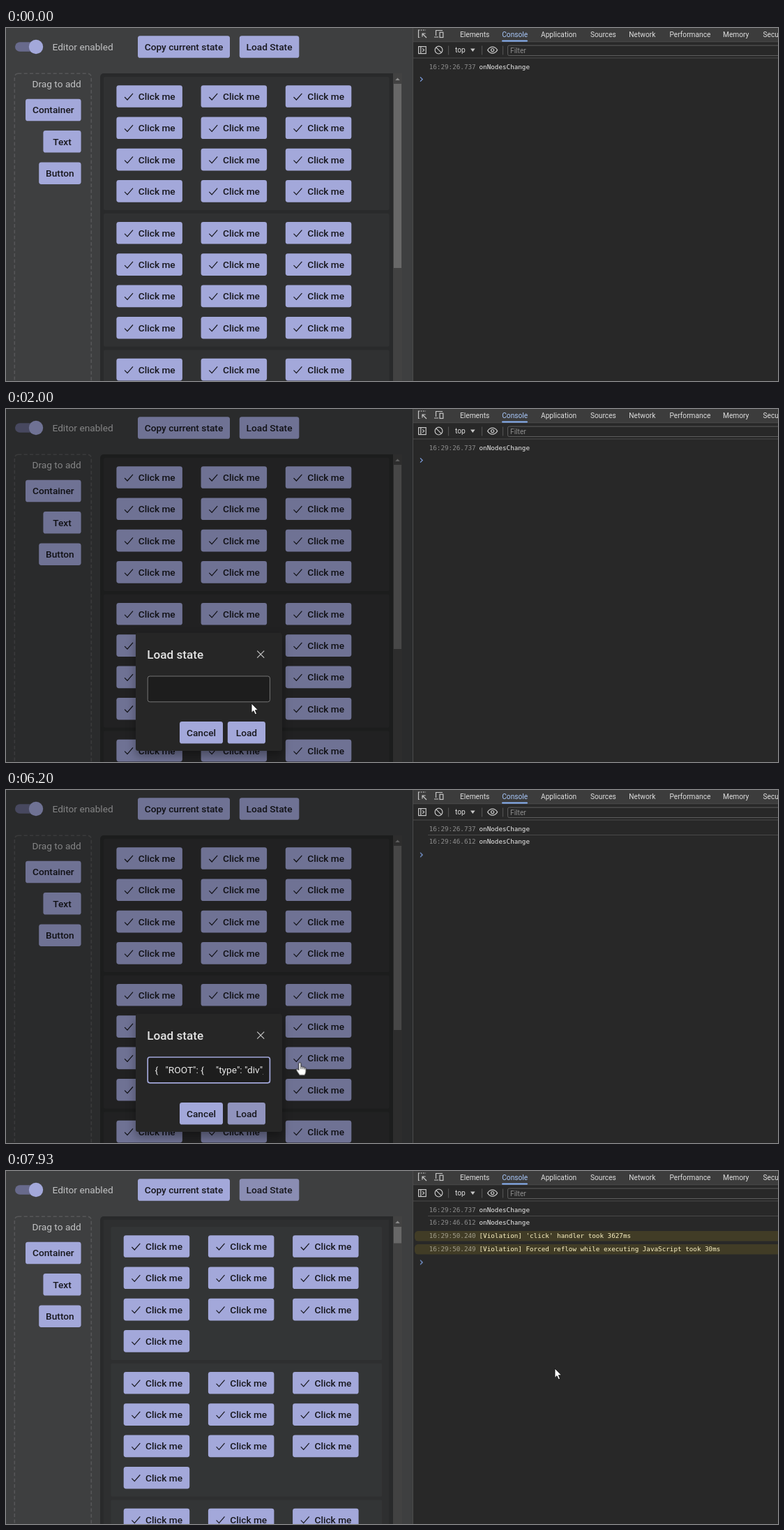
Animation, 1107 px wide and 506 px high, one loop 8 s. Source, as an HTML page:

```html
<!DOCTYPE html>
<html lang="en">
<head>
<meta charset="utf-8">
<title>Editor state loading</title>
<style>
  html, body { margin: 0; width: 100%; height: 100%; overflow: hidden; background: #282828; }
  svg { display: block; width: 100vw; height: 100vh; }
  text { white-space: pre; }
  .ui { font: 13.7px Roboto, sans-serif; fill: #c1c2c3; }
  .label { font: 500 13.7px Roboto, sans-serif; fill: #17171d; }
  .title { font: 500 17.1px Roboto, sans-serif; fill: #e4e4e4; }
  .dev { font: 10.2px Roboto, sans-serif; fill: #dedede; }
  .log { font: 9.28px "DejaVu Sans Mono", monospace; fill: #ececec; }
  .log .time { fill: #8e8e8e; }
  .warn { fill: #fcf3c4; }
  .warn .time { fill: #a39f8c; }
  .btn { fill: #a3a8da; }
  .line { fill: none; stroke: #c7c7c7; stroke-width: 1.2; }
  .check { fill: none; stroke: #17171d; stroke-width: 1.2; }

  /* One loop is 120 ticks of 1/15 s; one tick is 0.8333 % */
  .a { animation: 8s -4ms step-end infinite; }
  #before { animation-name: before; }
  #after { animation-name: after; }
  #loadState { animation-name: press; }
  #shade { animation-name: shade; }
  #dialog { animation-name: dialog; transform-origin: 291px 404px; }
  #field { animation-name: focus; }
  #pasted { animation-name: paste; }
  #loadBtn { animation-name: loadPress; }
  #log2 { animation-name: log2; }
  #warn1 { animation-name: warn1; }
  #warn2 { animation-name: warn2; }
  #prompt { animation-name: prompt; }
  #cursor { animation-name: move; }
  #arrow { animation-name: arrow; }
  #beam { animation-name: beam; }
  #hand { animation-name: hand; }

  @keyframes before { 0% { opacity: 1 } 89.167%, 100% { opacity: 0 } }
  @keyframes after { 0% { opacity: 0 } 89.167%, 100% { opacity: 1 } }
  @keyframes press {
    0% { fill: #a3a8da } 13.333% { fill: #8a8db3 } 18.333% { fill: #a3a8da }
    90%, 100% { fill: #8a8db3 }
  }
  @keyframes shade {
    0% { opacity: 0 } 17.5% { opacity: .1 } 18.333% { opacity: .6 } 19.167% { opacity: .92 }
    20% { opacity: 1 } 89.167% { opacity: .6 } 90% { opacity: .15 } 90.833%, 100% { opacity: 0 }
  }
  @keyframes dialog {
    0% { opacity: 0; transform: scale(.7) }
    17.5% { opacity: .29; transform: scale(.785) }
    18.333% { opacity: .9; transform: scale(.97) }
    19.167% { opacity: 1; transform: none }
    89.167% { opacity: .5; transform: scale(.85) }
    90%, 100% { opacity: 0; transform: scale(.7) }
  }
  @keyframes focus {
    0% { stroke: #757575; stroke-width: 1 }
    29.167%, 100% { stroke: #a3a8da; stroke-width: 1.7 }
  }
  @keyframes paste { 0% { opacity: 0 } 33.333%, 100% { opacity: 1 } }
  @keyframes loadPress { 0% { fill: #a3a8da } 42.5%, 100% { fill: #9093bd } }
  @keyframes log2 { 0% { opacity: 0 } 43.333%, 100% { opacity: 1 } }
  @keyframes warn1 { 0% { opacity: 0 } 88.333%, 100% { opacity: 1 } }
  @keyframes warn2 { 0% { opacity: 0 } 89.167%, 100% { opacity: 1 } }
  @keyframes prompt {
    0% { transform: none } 43.333% { transform: translateY(19.5px) }
    88.333% { transform: translateY(38.5px) } 89.167%, 100% { transform: translateY(57.5px) }
  }
  @keyframes move {
    0% { transform: translate(1200px, 600px) }
    .833% { transform: translate(1079px, 488px); animation-timing-function: steps(6) }
    5.833% { transform: translate(640px, 290px); animation-timing-function: steps(6) }
    10.833% { transform: translate(291px, 102px); animation-timing-function: steps(4) }
    14.167% { transform: translate(377px, 21px) }
    20% { transform: translate(377px, 21px); animation-timing-function: steps(2) }
    21.667% { transform: translate(379px, 127px); animation-timing-function: steps(4) }
    25% { transform: translate(352px, 422px); animation-timing-function: steps(3) }
    27.5% { transform: translate(300px, 401px) }
    35% { transform: translate(300px, 401px); animation-timing-function: steps(6) }
    40% { transform: translate(345.5px, 463px) }
    58.333% { transform: translate(345.5px, 463px); animation-timing-function: steps(8) }
    65% { transform: translate(487.5px, 354px); animation-timing-function: steps(2) }
    66.667% { transform: translate(504px, 345px) }
    67.5% { transform: translate(504px, 345px); animation-timing-function: steps(3) }
    70% { transform: translate(597px, 372px); animation-timing-function: steps(3) }
    72.5% { transform: translate(545px, 319px); animation-timing-function: steps(4) }
    75.833% { transform: translate(384px, 372px); animation-timing-function: steps(3) }
    78.333% { transform: translate(440px, 400px); animation-timing-function: steps(12) }
    88.333% { transform: translate(523px, 411px) }
    89.167% { transform: translate(523px, 411px); animation-timing-function: steps(12) }
    99.167%, 100% { transform: translate(787px, 283px) }
  }
  @keyframes arrow {
    0% { opacity: 1 } 14.167% { opacity: 0 } 17.5% { opacity: 1 } 26.667% { opacity: 0 }
    88.333%, 100% { opacity: 1 }
  }
  @keyframes beam { 0% { opacity: 0 } 26.667% { opacity: 1 } 37.5%, 100% { opacity: 0 } }
  @keyframes hand {
    0% { opacity: 0 } 14.167% { opacity: 1 } 17.5% { opacity: 0 }
    37.5% { opacity: 1 } 88.333%, 100% { opacity: 0 }
  }
</style>
</head>
<body>
<svg viewBox="0 0 1107 506" preserveAspectRatio="none">
  <defs>
    <g id="click">
      <rect class="btn" width="94.5" height="31.6" rx="3.4"/>
      <path class="check" d="M11.7 16.8l3.9 4 8-9.2"/>
      <text class="label" x="31.4" y="20.8">Click me</text>
    </g>
    <clipPath id="fieldClip"><rect x="213" y="385" width="156" height="32"/></clipPath>
    <filter id="shadow" x="-20%" y="-20%" width="140%" height="150%">
      <feDropShadow dx="0" dy="7" stdDeviation="7" flood-opacity=".35"/>
    </filter>
  </defs>

  <!-- Page -->
  <rect width="583" height="506" fill="#3e3f40"/>
  <rect x="13" y="20.2" width="37" height="13.6" rx="6.8" fill="#686a8c"/>
  <circle class="btn" cx="43" cy="27" r="10.2"/>
  <text class="ui" x="66.5" y="31.6">Editor enabled</text>
  <rect x="12.3" y="65.3" width="110" height="460" rx="5" fill="none" stroke="#565758" stroke-width="1.6" stroke-dasharray="5 3.4"/>
  <text class="ui" x="107.8" y="84.6" text-anchor="end">Drag to add</text>
  <g id="tools"></g>
  <path d="M135 506V70a5 5 0 0 1 5-5H555V506z" fill="#292a2b"/>
  <rect x="555" y="65" width="13" height="441" fill="#424242"/>
  <path d="M558.2 75l3.3-3.6 3.3 3.6z" fill="#8a8a8a"/>
  <g id="before" class="a"><rect x="556" y="80" width="11" height="264" fill="#686868"/></g>
  <g id="after" class="a">
    <rect x="140" y="70" width="409" height="436" fill="#2e2f30"/>
    <rect x="556" y="80" width="11" height="23.5" fill="#686868"/>
  </g>
  <rect id="shade" class="a" width="583" height="506" fill="#000" fill-opacity=".32"/>

  <!-- Dialog -->
  <g id="dialog" class="a">
    <rect x="186" y="320.5" width="210" height="169.5" rx="3.4" fill="#252525" filter="url(#shadow)"/>
    <text class="title" x="202.3" y="357.8">Load state</text>
    <path class="line" d="M360.2 346.7l10 10m0-10l-10 10"/>
    <rect id="field" class="a" x="203.2" y="383" width="175.2" height="36.8" rx="3" fill="#1d1d1d"/>
    <g clip-path="url(#fieldClip)">
      <text id="pasted" class="ui a" x="213.6" y="406.2" style="fill:#e6e6e6">{   "ROOT": {     "type": "div",     "isCanvas": true,</text>
    </g>
    <g id="actions"></g>
  </g>

  <!-- Developer tools -->
  <rect x="583" width="524" height="506" fill="#282828"/>
  <rect x="583" width="524" height="19.5" fill="#3c3c3c"/>
  <path d="M583.5 0V506M583 19.7H1107M583 43H1107" stroke="#4b4b4b" fill="none"/>
  <rect x="711" y="17.6" width="37" height="2" rx="1" fill="#8ab4f8"/>
  <g id="tabs"></g>
  <g class="line">
    <path d="M591.5 13V3H602M591.5 3v10.5h3" stroke-dasharray="2 1.3"/>
    <path d="M603 14l-6-6m0 4.6V8h4.6"/>
    <path d="M616.5 11V3.5H626M614 13h6"/>
    <rect x="622" y="6.2" width="4.8" height="7.3"/>
    <rect x="591.6" y="26.6" width="10.6" height="10"/>
    <path d="M594.8 26.6v10m2.4-7.2l2.4 2.2-2.4 2.2"/>
    <circle cx="620.5" cy="31.6" r="5.4"/>
    <path d="M616.8 27.8l7.5 7.6"/>
    <path d="M690.6 31.6c3.5-6 10.4-6 14 0-3.6 6-10.5 6-14 0z"/>
    <circle cx="697.6" cy="31.6" r="2.1"/>
    <path d="M634.5 25.5v13M682.5 25.5v13M712.5 25.5v13" stroke="#505050"/>
    <rect x="719.5" y="25" width="395" height="14.5" rx="2" stroke="#5d5d5d" stroke-width="1"/>
  </g>
  <text class="dev" x="644" y="35.4">top</text>
  <path d="M666 29.6h6.6l-3.3 4.4z" fill="#c7c7c7"/>
  <text class="dev" x="723" y="36.2" style="fill:#8f8f8f">Filter</text>
  <g id="console"></g>
  <path id="prompt" class="a" d="M594 70.4l3.2 3.1-3.2 3.1" fill="none" stroke="#7e9fe0" stroke-width="1.2"/>

  <!-- Pointer -->
  <g id="cursor" class="a" stroke="#111" stroke-width=".9" stroke-linejoin="round">
    <path id="arrow" class="a" d="M0 0V13.4L3 10.7 5.2 15.8 7.5 14.8 5.4 9.8H9.5z" fill="#fff"/>
    <path id="beam" class="a" d="M-2.5-7H-.6L0-6.4.6-7H2.5M0-6.4V6.4M-2.5 7H-.6L0 6.4.6 7H2.5" fill="none" stroke="#ddd"/>
    <path id="hand" class="a" d="M-1.7 1.2C-1.7-.4 1.6-.4 1.6 1.2V6.2C2.2 5.2 4 5.4 4.2 6.6 5 5.9 6.5 6.2 6.7 7.4 7.6 6.9 8.9 7.5 8.9 8.6V12.6C8.9 15 7.6 16 7.4 18.2H-.8C-1 16-5.4 12.4-5.2 10 -5 8.7-3.3 8.7-1.7 10.8zM1.6 6.2V9.3M4.2 6.6V9.4M6.7 7.4V9.8" fill="#fff"/>
  </g>
</svg>
<script>
  const put = (id, html) => document.getElementById(id).insertAdjacentHTML('beforeend', html);

  const button = (label, x, y, w, id) =>
    `<rect class="btn${id ? ' a' : ''}"${id ? ` id="${id}"` : ''} x="${x}" y="${y}" width="${w}" height="31.6" rx="3.4"/>` +
    `<text class="label" x="${x + w / 2}" y="${y + 20.7}" text-anchor="middle">${label}</text>`;

  // Three stacked containers, each with a grid of buttons
  function containers(x, y, w, count, fill) {
    let out = '';
    for (let c = 0; c < 3; c++) {
      const top = y + c * 195.8;
      out += `<rect x="${x}" y="${top}" width="${w}" height="191" rx="2" fill="${fill}"/>`;
      for (let i = 0; i < count; i++) {
        const bx = x + 18.4 + (i % 3) * 121.2;
        const by = top + 12.2 + Math.floor(i / 3) * 45.3;
        out += `<use href="#click" x="${bx}" y="${by}"/>`;
      }
    }
    return out;
  }

  function logRow(y, time, message, id, warn) {
    const back = warn
      ? `<rect x="586" y="${y - 10.4}" width="530" height="14.6" rx="5" fill="#413c26"/>`
      : id ? `<path d="M605 ${y - 12.7}H1107" stroke="#484848"/>` : '';
    return `<g class="log${id ? ' a' : ''}${warn ? ' warn' : ''}"${id ? ` id="${id}"` : ''}>${back}` +
      `<text class="time" x="606.7" y="${y}">${time}</text><text x="678.5" y="${y}"${warn ? ' class="warn"' : ''}>${message}</text></g>`;
  }

  put('tools',
    button('Copy current state', 189, 11.2, 132) +
    button('Load State', 334.8, 11.2, 85.5, 'loadState') +
    button('Container', 28, 101.7, 79.6) +
    button('Text', 53.4, 147, 54.2) +
    button('Button', 47.2, 192.4, 60.4));
  put('before', containers(140, 70, 409.5, 12, '#303132'));
  put('after', containers(150.3, 80, 389, 10, '#333536'));
  put('actions', button('Cancel', 249, 448, 62) + button('Load', 317.8, 448, 54.2, 'loadBtn'));

  const tabs = { Elements: 651, Console: 711.2, Application: 767, Sources: 838, Network: 893.3,
    Performance: 951.5, Memory: 1028, Security: 1085.5 };
  put('tabs', Object.entries(tabs).map(([name, x]) =>
    `<text class="dev" x="${x}" y="13"${name === 'Console' ? ' style="fill:#a8c7fa"' : ''}>${name}</text>`).join(''));

  put('console',
    logRow(58.6, '16:29:26.737', 'onNodesChange') +
    logRow(77.2, '16:29:46.612', 'onNodesChange', 'log2') +
    logRow(96.4, '16:29:50.240', "[Violation] 'click' handler took 3627ms", 'warn1', true) +
    logRow(115.4, '16:29:50.249', '[Violation] Forced reflow while executing JavaScript took 30ms', 'warn2', true));
</script>
</body>
</html>
```
